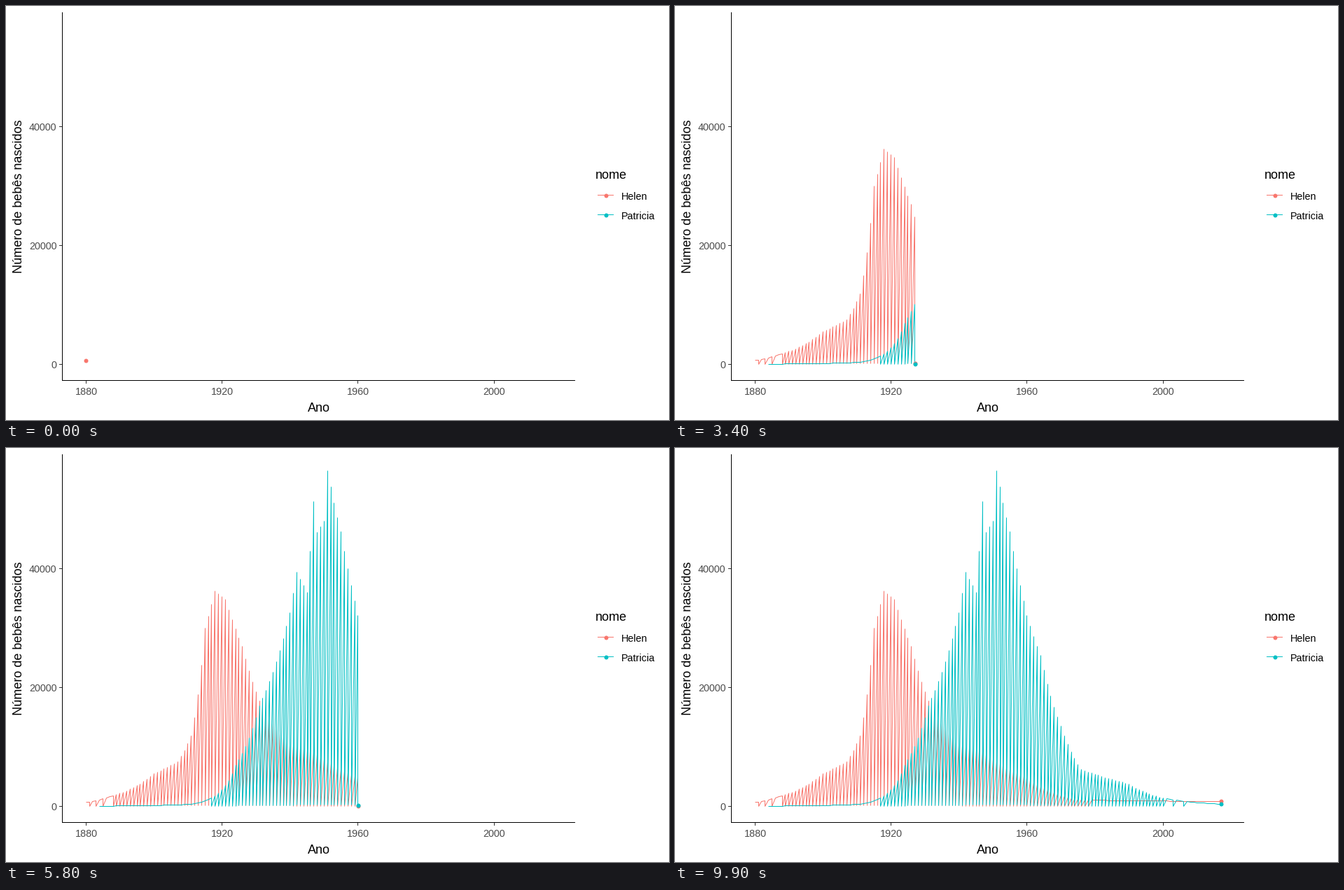
A matplotlib script that plays this animation: 947 px wide and 592 px high, repeating every 10000 ms.

```python
import numpy as np
import matplotlib.pyplot as plt
from matplotlib.animation import FuncAnimation

W, H, DPI = 947, 592, 100
FRAMES, INTERVAL = 100, 100
FIRST, LAST = 1880, 2017
RED, TEAL, GREY = "#F8766D", "#00BFC4", "#4D4D4D"
SMALL, BIG = 14.4, 17.95
PT = 72 / DPI  # points per pixel

plt.rcParams["font.family"] = "Liberation Sans"
plt.rcParams["path.simplify"] = False


def year_x(year):
    return 114.2 + (np.asarray(year) - FIRST) * 4.8593


def count_y(count):
    return 512.2 - np.asarray(count) * 0.0085


def crisp(v):
    """Centre of the pixel that holds v."""
    return np.floor(v) + 0.5


def growth(keys):
    """Exponential growth or decay between a few (year, count) points."""
    years, counts = zip(*keys)
    return lambda year: np.exp(np.interp(year, years, np.log(counts)))


def bell(peak, width, height):
    return lambda year: height * np.exp(-((year - peak) / width) ** 2) + 8


helen_girls = growth([
    (1880, 630), (1888, 1780), (1900, 5500), (1907, 7500), (1911, 11800),
    (1915, 30000), (1918, 36151), (1921, 34800), (1926, 26900),
    (1931, 17700), (1940, 10200), (1947, 9100), (1960, 4800),
    (1970, 1900), (1974, 1180), (1980, 990), (2004, 830), (2017, 830),
])
patricia_girls = growth([
    (1884, 6), (1892, 60), (1900, 113), (1910, 290), (1917, 1391),
    (1924, 6900), (1931, 16900), (1935, 22600), (1940, 32600),
    (1942, 39400), (1945, 36000), (1947, 51276), (1948, 46134),
    (1950, 47942), (1951, 56433), (1955, 46212), (1960, 32100),
    (1964, 25400), (1970, 13500), (1976, 6200), (1980, 5400),
    (1990, 3750), (2000, 1380), (2006, 820), (2017, 340),
])


def helen_has_boys(year):
    return 1888 <= year <= 1978 or (year % 2 == 1 and year < 1887)


def patricia_has_boys(year):
    return 1917 <= year <= 2000 or (year % 3 == 2 and 2000 < year < 2008)


def series(start, girls, boys, has_boys):
    """Girls first, then boys, within each year: the line becomes a saw."""
    rows = []
    for year in range(start, LAST + 1):
        rows.append((year, girls(year)))
        if has_boys(year):
            rows.append((year, boys(year)))
    years, counts = np.array(rows, float).T
    return years, year_x(years), count_y(counts)


helen = series(1880, helen_girls, bell(1920, 15, 110), helen_has_boys)
patricia = series(1884, patricia_girls, bell(1951, 17, 180),
                  patricia_has_boys)

# Frame on which each year first appears
all_years = np.arange(FIRST, LAST + 1)
year_frame = np.round((all_years - FIRST) * (FRAMES - 1) / (LAST - FIRST))

fig = plt.figure(figsize=(W / DPI, H / DPI), dpi=DPI, facecolor="white")
ax = fig.add_axes([0, 0, 1, 1])
ax.set_xlim(0, W)
ax.set_ylim(H, 0)
ax.axis("off")


def stroke(xs, ys, color, z=2):
    return ax.plot(xs, ys, color=color, lw=PT, zorder=z, snap=False,
                   solid_capstyle="butt", solid_joinstyle="bevel")[0]


def dot(xs, ys, color, z=3):
    return ax.plot(xs, ys, "o", color=color, ms=6 * PT, mew=0, zorder=z)[0]


def label(x, y, text, size, color="black", **kw):
    ax.text(x, y, text, fontsize=size * PT, color=color, va="baseline", **kw)


# Axes
stroke([80.5, 80.5], [9, 536], "black", 3)
stroke([80, 813], [535.5, 535.5], "black", 3)
for year in (1880, 1920, 1960, 2000):
    x = crisp(year_x(year))
    stroke([x, x], [536, 540], "#333333")
    label(x, 556, str(year), SMALL, GREY, ha="center")
for count in (0, 20000, 40000):
    y = crisp(count_y(count))
    stroke([76, 80], [y, y], "#333333")
    label(72.3, y + 5.3, str(count), SMALL, GREY, ha="right")
label(446.5, 580, "Ano", BIG, ha="center")
label(23.3, 272, "Número de bebês nascidos", BIG, ha="center",
      rotation=90, rotation_mode="anchor")

# Legend
label(842, 247, "nome", BIG)
for y, name, color in ((270.5, "Helen", RED), (298.5, "Patricia", TEAL)):
    stroke([845, 868], [y, y], color)
    dot([856.5], [y], color)
    label(879, y + 6.5, name, SMALL)

# Data
tracks = []
for z, (data, color) in enumerate(((helen, RED), (patricia, TEAL))):
    tracks.append((data, stroke([], [], color, 4 + z),
                   dot([], [], color, 6 + z)))


def update(frame):
    year = all_years[year_frame <= frame][-1]
    artists = []
    for (years, xs, ys), line, tip in tracks:
        n = np.searchsorted(years, year, side="right")
        line.set_data(crisp(xs[:n]), crisp(ys[:n]))
        tip.set_data(xs[:n][-1:], ys[:n][-1:])
        artists += [line, tip]
    return artists


anim = FuncAnimation(fig, update, frames=FRAMES, interval=INTERVAL,
                     init_func=lambda: update(0), repeat=True)
plt.show()
```
